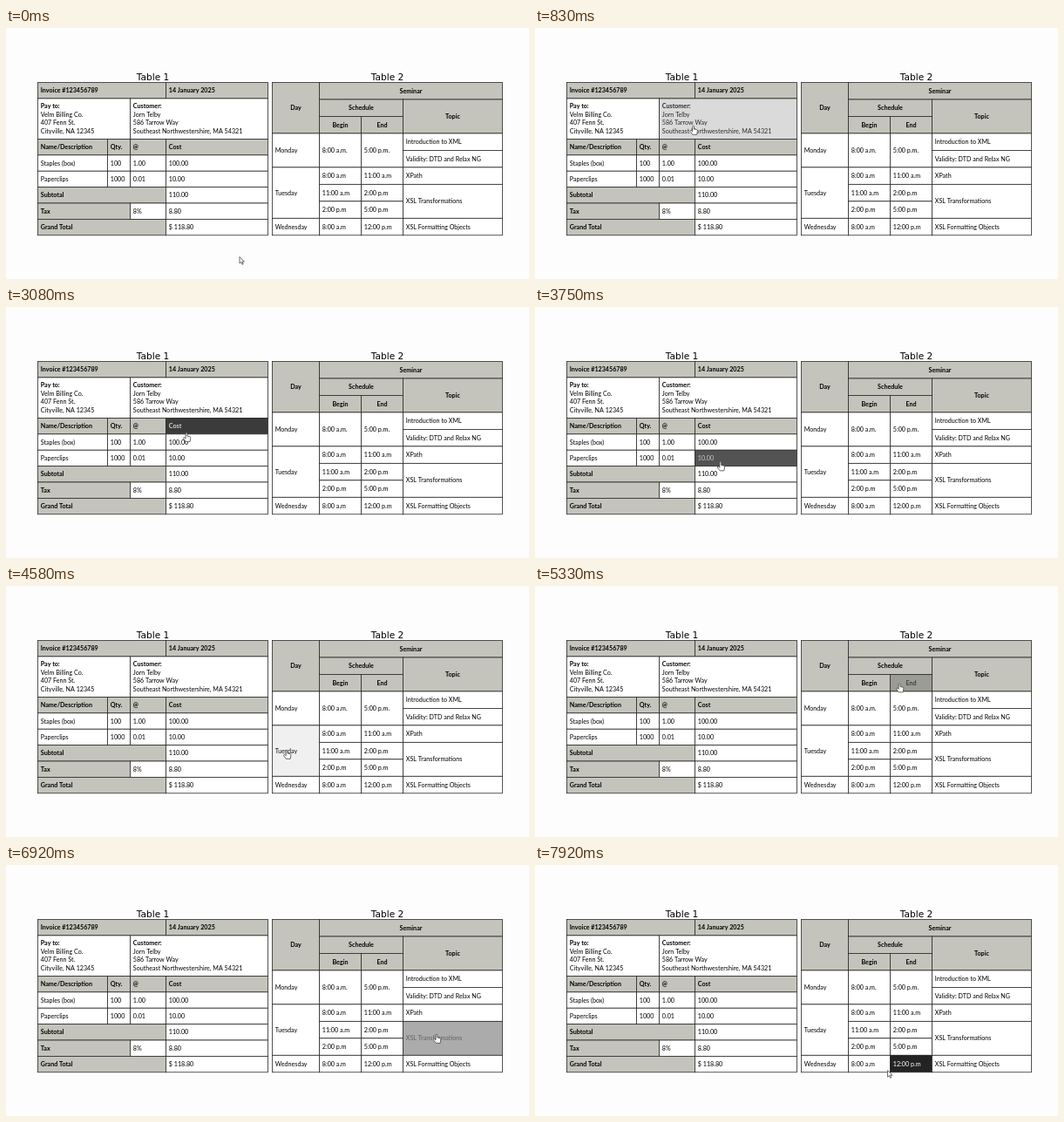
An HTML page with a canvas that plays this animation: 600 px wide and 288 px high, repeating every 8000 ms.

```html
<!DOCTYPE html>
<html lang="en">
<head>
<meta charset="utf-8">
<title>Table cell hover</title>
<style>
  html, body { margin: 0; width: 100%; height: 100%; overflow: hidden; background: #fdfdfd; }
  canvas { display: block; }
</style>
</head>
<body>
<canvas id="stage" width="600" height="288"></canvas>
<script>
const ctx = document.getElementById('stage').getContext('2d');
const LOOP = 8000, STEP = LOOP / 96, FADE = 300, LAG = 30, SAMPLES = 60;
const TOP = 62.5, BOTTOM = 237.8;
const WHITE = [255, 255, 255], GRAY = [196, 196, 188], DARK = [35, 35, 36], BLACK = [0, 0, 0];

const cells = [];

// Row edges from relative heights, filling the space between TOP and BOTTOM.
function rowEdges(heights) {
  const unit = (BOTTOM - TOP) / heights.reduce((a, b) => a + b);
  return heights.reduce((edges, h) => [...edges, edges.at(-1) + h * unit], [TOP]);
}

// Returns a function that adds cells by column and row edge indexes.
function table(xs, ys) {
  return (c0, c1, r0, r1, text, style = '') => cells.push({
    x: xs[c0], y: ys[r0], w: xs[c1] - xs[c0], h: ys[r1] - ys[r0],
    lines: text.split('|'),
    gray: style.includes('g'),
    bold: style.includes('b'),
    boldFirst: style.includes('f'),
    centered: style.includes('c'),
  });
}

const invoice = table([36.5, 116.5, 142.5, 183.5, 300.5], rowEdges([1, 2.53, 1, 1, 1, 1, 1, 1]));
invoice(0, 3, 0, 1, 'Invoice #123456789', 'gb');
invoice(3, 4, 0, 1, '14 January 2025', 'gb');
invoice(0, 2, 1, 2, 'Pay to:|Velm Billing Co.|407 Fenn St.|Cityville, NA 12345', 'f');
invoice(2, 4, 1, 2, 'Customer:|Jorn Telby|586 Tarrow Way|Southeast Northwestershire, MA 54321', 'f');
['Name/Description', 'Qty.', '@', 'Cost'].forEach((s, i) => invoice(i, i + 1, 2, 3, s, 'gb'));
['Staples (box)', '100', '1.00', '100.00'].forEach((s, i) => invoice(i, i + 1, 3, 4, s));
['Paperclips', '1000', '0.01', '10.00'].forEach((s, i) => invoice(i, i + 1, 4, 5, s));
invoice(0, 3, 5, 6, 'Subtotal', 'gb');
invoice(3, 4, 5, 6, '110.00');
invoice(0, 2, 6, 7, 'Tax', 'gb');
invoice(2, 3, 6, 7, '8%');
invoice(3, 4, 6, 7, '8.80');
invoice(0, 3, 7, 8, 'Grand Total', 'gb');
invoice(3, 4, 7, 8, '$ 118.80');

const seminar = table([305.5, 359.5, 407.5, 455.5, 569.5], rowEdges(Array(9).fill(1)));
seminar(0, 1, 0, 3, 'Day', 'gbc');
seminar(1, 4, 0, 1, 'Seminar', 'gbc');
seminar(1, 3, 1, 2, 'Schedule', 'gbc');
seminar(3, 4, 1, 3, 'Topic', 'gbc');
seminar(1, 2, 2, 3, 'Begin', 'gbc');
seminar(2, 3, 2, 3, 'End', 'gbc');
seminar(0, 1, 3, 5, 'Monday');
seminar(1, 2, 3, 5, '8:00 a.m.');
seminar(2, 3, 3, 5, '5:00 p.m.');
seminar(3, 4, 3, 4, 'Introduction to XML');
seminar(3, 4, 4, 5, 'Validity: DTD and Relax NG');
seminar(0, 1, 5, 8, 'Tuesday');
[['8:00 a.m', '11:00 a.m'], ['11:00 a.m', '2:00 p.m'], ['2:00 p.m', '5:00 p.m'], ['8:00 a.m', '12:00 p.m']]
  .forEach(([begin, end], i) => {
    seminar(1, 2, 5 + i, 6 + i, begin);
    seminar(2, 3, 5 + i, 6 + i, end);
  });
seminar(3, 4, 5, 6, 'XPath');
seminar(3, 4, 6, 8, 'XSL Transformations');
seminar(0, 1, 8, 9, 'Wednesday');
seminar(3, 4, 8, 9, 'XSL Formatting Objects');

// Key points of the pointer: time, x, y
const path = [
  [80, 268, 265], [830, 182, 112], [1500, 103, 96], [1800, 103, 96], [2250, 104, 137],
  [2770, 181, 141], [3083, 207, 144], [4000, 215, 190], [4520, 300, 190], [4583, 322, 188],
  [5000, 384, 110], [5450, 430, 112], [5890, 455, 146], [6083, 473, 145],
  [6770, 492, 179], [6917, 494, 194], [7400, 484, 229], [7917, 404.5, 238.1],
];

function pointerAt(t) {
  const next = path.findIndex(p => p[0] > t);
  if (next === 0) return path[0].slice(1);
  if (next < 0) return path.at(-1).slice(1);
  const [t0, x0, y0] = path[next - 1], [t1, x1, y1] = path[next];
  const k = (t - t0) / (t1 - t0);
  return [x0 + (x1 - x0) * k, y0 + (y1 - y0) * k];
}

const inside = (cell, [x, y]) =>
  x >= cell.x && x < cell.x + cell.w && y >= cell.y && y < cell.y + cell.h;

const mix = (a, b, k) => `rgb(${a.map((v, i) => Math.round(v + (b[i] - v) * k))})`;

function drawCell(cell, level) {
  const { x, y, w, h, lines } = cell;
  ctx.fillStyle = mix(cell.gray ? GRAY : WHITE, DARK, level);
  ctx.fillRect(x, y, w, h);
  ctx.strokeStyle = '#2a2a2a';
  ctx.strokeRect(x, y, w, h);
  ctx.fillStyle = mix(BLACK, WHITE, level);
  ctx.textAlign = cell.centered ? 'center' : 'left';
  lines.forEach((line, i) => {
    const bold = cell.bold || (cell.boldFirst && i === 0);
    ctx.font = `${bold ? 'bold' : 'normal'} 7.15px Lato, "Open Sans", sans-serif`;
    const baseline = y + h / 2 + 2.5 + (i - (lines.length - 1) / 2) * 9.6;
    ctx.fillText(line, cell.centered ? x + w / 2 : x + 3.3, baseline);
  });
}

const arrow = new Path2D('M0-2.5V5.1L1.8 3.5L3 6.3L4.2 5.8L3 3.1H5.4Z');
const hand = new Path2D('M-.9 .8Q0-.6 .9 .8V4L4 4.7Q5 5 4.8 6.3L4.1 10.4H-.8L-3.6 6.6Q-3.4 5.2-2.2 5.7L-.9 6.8Z');

function drawPointer([x, y], shape) {
  ctx.save();
  ctx.translate(x, y);
  ctx.fillStyle = '#fff';
  ctx.strokeStyle = '#444';
  ctx.fill(shape);
  ctx.stroke(shape);
  ctx.restore();
}

function draw(t) {
  ctx.fillStyle = '#fdfdfd';
  ctx.fillRect(0, 0, 600, 288);
  ctx.fillStyle = '#000';
  ctx.textAlign = 'center';
  ctx.font = '10.6px "DejaVu Sans", sans-serif';
  ctx.fillText('Table 1', 168.5, 60);
  ctx.fillText('Table 2', 437.5, 60);

  // Cells darken while hovered and reset at once when the pointer leaves.
  const trail = Array.from({ length: SAMPLES }, (_, i) => pointerAt(t - LAG - i * FADE / SAMPLES));
  ctx.lineWidth = 0.8;
  for (const cell of cells) {
    const left = trail.findIndex(p => !inside(cell, p));
    drawCell(cell, left < 0 ? 1 : left / SAMPLES);
  }
  const tip = pointerAt(t);
  drawPointer(tip, cells.some(cell => inside(cell, tip)) ? hand : arrow);
}

const start = performance.now();
function tick() {
  const t = (performance.now() - start) % LOOP;
  draw(Math.floor(t / STEP + 0.05) * STEP);
  requestAnimationFrame(tick);
}
tick();
</script>
</body>
</html>
```
